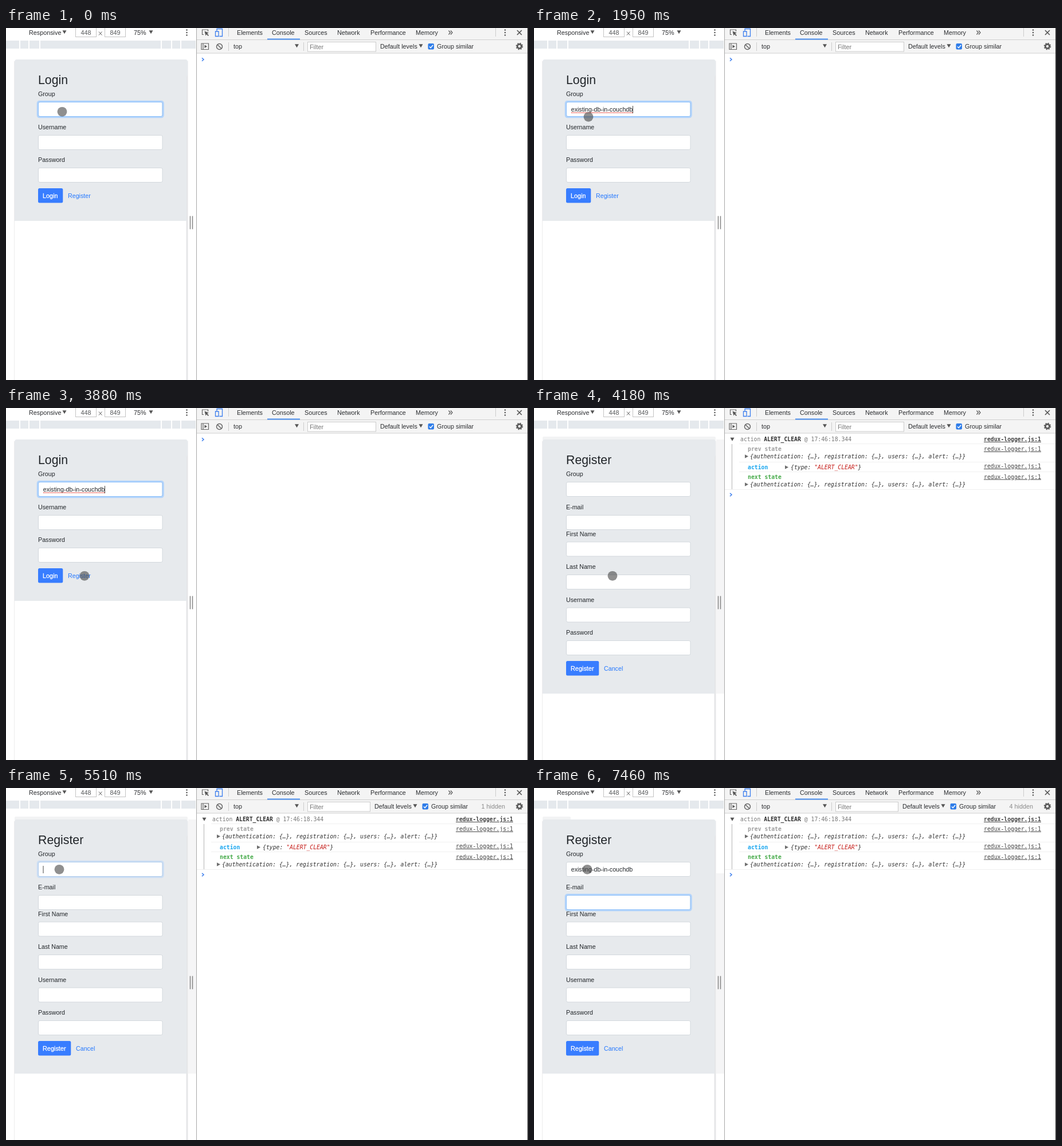
Write an HTML page that moves like this. It is 911 by 615 pixels and loops after 8000 ms.

```html
<!DOCTYPE html>
<html lang="en">
<head>
<meta charset="utf-8">
<title>Login and register</title>
<style>
  html, body { margin: 0; width: 100%; height: 100%; overflow: hidden; background: #fff; }
  svg { display: block; width: 911px; height: 615px; }
  text { font: 10.8px "Liberation Sans", Arial, sans-serif; fill: #2b2d30; white-space: pre; }
  .form { font-size: 10.7px; fill: #212529; }
  .title { font-size: 21.3px; fill: #212529; }
  .link { font-size: 10.7px; fill: #2478ff; }
  .btn { font-size: 10.9px; fill: #fff; stroke: #fff; stroke-width: .3px; }
  .mono { font: 9.78px "DejaVu Sans Mono", monospace; fill: #303030; }
  .b { font-weight: bold; }
  .i { font-style: italic; }
  .src { text-decoration: underline; text-anchor: end; fill: #444; }
  .mid { text-anchor: middle; }
</style>
</head>
<body>
<svg id="stage" viewBox="0 0 911 615"></svg>
<script>
const LOOP = 8000;
const rect = (x, y, w, h, fill, more = '') =>
  `<rect x="${x}" y="${y}" width="${w}" height="${h}" fill="${fill}" ${more}/>`;
const text = (x, y, s, cls = '', more = '') => `<text x="${x}" y="${y}" class="${cls}" ${more}>${s}</text>`;
const line = (d, color, width = 1, more = '') =>
  `<path d="${d}" fill="none" stroke="${color}" stroke-width="${width}" ${more}/>`;
const shape = (d, fill) => `<path d="${d}" fill="${fill}"/>`;
const down = (x, y, s = 3.5) => shape(`M${x - s} ${y - s * .8}h${2 * s}l${-s} ${s * 1.7}z`, '#555');
const right = (x, y) => shape(`M${x} ${y - 3.3}v6.6l6-3.3z`, '#6e6e6e');
const dots = (x, y) => [-4.5, 0, 4.5].map(d => `<circle cx="${x}" cy="${y + d}" r="1.3" fill="#5a5a5a"/>`).join('');
const group = (id, body) => `<g id="${id}">${body}</g>`;
const input = y => rect(56.5, y + .5, 216.5, 25, '#fff', 'rx="2.5" stroke="#d3d8dd"');
const field = (label, y) => text(56, y - 10, label, 'form') + input(y);
const ring = (id, y) => group(id,
  rect(55, y - 1, 219.5, 28, 'none', 'rx="3.5" stroke="#b3d4fb" stroke-width="2.6"') +
  rect(56.5, y + .5, 216.5, 25, 'none', 'rx="2.5" stroke="#8cc0fb"'));
const button = (y, w, label, link) => rect(56, y, w, 25.5, '#387dff', 'rx="2.5"') +
  text(64, y + 16.5, label, 'btn') + text(56 + w + 8.7, y + 16.5, link, 'link');

function deviceBar() {
  const ruler = [[0, 23], [25, 39], [41, 58], [60, 270], [272, 288], [290, 304], [306, 331]];
  const size = (x, n) => rect(x + .5, -2.5, 36, 18, '#fff', 'stroke="#c4c4c4"') + text(x + 18.5, 12, n, 'mid', 'fill-opacity=".8"');
  return text(40, 11.5, 'Responsive') + down(102, 7) + size(121, 448) +
    line('M162 6.5l5.5 6m0-6l-5.5 6', '#555') + size(172, 849) +
    text(223, 11.5, '75%') + down(253, 7) + dots(315.5, 8) +
    ruler.map(([a, b]) => rect(a, 22, b - a, 14, '#e5e9ed')).join('');
}

function devtools() {
  const tabs = { Elements: 403, Console: 464, Sources: 521, Network: 578, Performance: 636, Memory: 715 };
  return rect(333, 0, 578, 44, '#f4f4f4') + rect(333, 44, 578, 571, '#fff') +
    line('M333 20.5H911M333 44H911', '#cfcfcf') + rect(456, 18.5, 57, 2, '#4b8ff0') +
    Object.entries(tabs).map(([s, x]) => text(x, 12, s)).join('') +
    line('M388.5 0V15M854.5 0V15M388.5 25V40M519.5 25V40', '#cccccc') +
    // inspect and device icons
    line('M345 11.5h-2.5v-8.5h10v3', '#666', 1.2) + shape('M346.5 5.5l7.5 3-3 1.2 3 3-1.2 1.2-3-3-1.3 2.8z', '#555') +
    line('M368 5V1.5h9.5v13h-5M365.5 6h5.5v8.5h-5.5z', '#3b7ded', 1.3) +
    line('M772.5 4.5l3 3.5-3 3.5m3.5-7l3 3.5-3 3.5', '#555', 1.2) + dots(871, 8) +
    line('M892 4l8 8m0-8l-8 8', '#555', 1.7) +
    // sidebar, clear and settings icons
    line('M341 27h12.500v10.500H341zM344 27v10.500', '#666', 1.2) + shape('M346.500 29.500v5.500l4.500-2.750z', '#555') +
    '<circle cx="372.5" cy="32.500" r="5" fill="none" stroke="#666" stroke-width="1.5"/>' + line('M369 29l7 7', '#666', 1.5) +
    text(397, 35.5, 'top') + down(507.5, 31) +
    '<rect id="filter" x="526.5" y="24.5" width="119" height="16.5" fill="#fff" stroke="#cbcbcb"/>' +
    text(530, 36.5, 'Filter', '', 'style="fill:#777"') +
    group('levels', text(653, 35.5, 'Default levels') + down(724, 31) +
      rect(736.5, 27, 10.500, 10.500, '#2f7de9', 'rx="2"') + line('M739 32.500l2.200 2.200 4-5', '#fff', 1.5) +
      text(752, 35.5, 'Group similar')) +
    text(871, 35.5, '', '', 'id="hidden" style="fill:#8a8a8a;text-anchor:end"') +
    '<circle cx="896" cy="32" r="3.600" fill="none" stroke="#5a5a5a" stroke-width="2.800"/>' +
    '<circle cx="896" cy="32" r="5.500" fill="none" stroke="#5a5a5a" stroke-width="1.600" stroke-dasharray="2.160"/>' +
    group('prompt', line('M342 -2.7l3 2.700-3 2.700', '#3b7ded', 1.5)) +
    rect(332, 0, 1, 615, '#a8a8a8') + rect(910, 0, 1, 615, '#3a3a3a');
}

function logRows() {
  const state = '{authentication: {…}, registration: {…}, users: {…}, alert: {…}}';
  const tag = (y, s, color) => text(373, y, s, 'mono b', `style="fill:${color}"`);
  return line('M358 62.500H910M358 94.500H910M358 111.500H910M333 142.500H910', '#f0f0f0') +
    line('M345.500 63V142', '#b5b5b5') + down(346, 54.5) +
    text(360, 58, '<tspan fill="#777">action</tspan> <tspan class="b">ALERT_CLEAR</tspan> <tspan fill="#777">@ 17:46:18.344</tspan>', 'mono') +
    tag(75, 'prev state', '#9e9e9e') + tag(107, 'action', '#16a5ef') + tag(124, 'next state', '#45aa49') +
    [88, 137].map(y => right(368, y - 3.5) + text(377, y, state, 'mono i')).join('') +
    right(438, 103.5) + text(448, 107, '{type: <tspan fill="#c41a16">"ALERT_CLEAR"</tspan>}', 'mono i') +
    [58, 75, 105, 123.5].map((y, i) => text(885, y, 'redux-logger.js:1', 'mono src' + (i ? '' : ' b'))).join('');
}

const $ = id => document.getElementById(id);
$('stage').innerHTML = rect(0, 0, 911, 615, '#fff') + deviceBar() +
  rect(14, 58, 1, 557, '#ececec') + rect(314.5, 58, 3, 557, '#e5e6e8') +
  group('ghost', rect(15, 50, 302, 8, '#f2f3f4', 'id="band" rx="2"') + rect(318, 55, 14, 444, '#f5f5f6', 'id="side"')) +
  rect(15, 55, 302, 30, '#e7eaed', 'rx="4"') +
  '<rect id="panel" x="15" y="60" width="300" fill="#e7eaed"/>' +
  text(56, 98, '', 'title', 'id="title"') + field('Group', 129) +
  group('login', field('Username', 187) + field('Password', 244) + button(280, 43.3, 'Login', 'Register')) +
  group('register', field('E-mail', 187) + field('First Name', 233.5) + field('Last Name', 291) +
    field('Username', 348.5) + field('Password', 406) + button(442, 57.3, 'Register', 'Cancel')) +
  ring('ringGroup', 129) + ring('ringMail', 187) +
  group('typed', text(64.7, 146, 'existing-db-in-couchdb', 'form')) +
  group('spell', line('M65 148H172', '#e5433c', 1.3, 'stroke-dasharray="1.4 1"')) +
  rect(0, 0, 1, 13, '#444', 'id="caret"') +
  line('M321.500 328.500V351.500M325.500 328.500V351.500', '#858585', 1.5) + devtools() + group('log', logRows()) +
  '<circle id="mouse" r="8.4" fill="#444" fill-opacity=".6"/>';

// pointer stops: time, x, y
const path = [
  [0, 98, 146], [1950, 95, 155], [2090, 94, 178], [2240, 95, 196], [2390, 96, 204],
  [3280, 98, 208], [3430, 108, 232], [3580, 122, 262], [3730, 133, 285], [3880, 137, 293],
  [4770, 132, 272], [4920, 115, 210], [5060, 100, 150], [5210, 94, 126], [5360, 93, 142]
];
// the caret flips at each of these times
const blinks = [300, 750, 900, 1350, 1950, 2390, 2830, 3280, 3730, 4180, 5510, 5960, 6410, 7460];
const show = (id, on) => $(id).style.display = on ? '' : 'none';

function draw(t) {
  const within = (a, b) => t >= a && t < b;
  const registering = t >= 4180, pasted = within(900, 4180) || t >= 6410;
  const onMail = t >= 7010;

  $('title').textContent = registering ? 'Register' : 'Login';
  $('panel').setAttribute('height', registering ? 439 : 277);
  show('login', !registering);
  show('register', registering);
  show('log', registering);
  $('prompt').setAttribute('transform', `translate(0 ${registering ? 151.5 : 55})`);

  show('ghost', registering);
  $('band').setAttribute('width', t < 6410 ? 302 : 49);
  $('side').setAttribute('y', t < 6410 ? 55 : 149);
  $('side').setAttribute('height', t < 6410 ? 444 : 350);

  const narrow = t >= 4480;
  $('filter').setAttribute('width', narrow ? 109 : 119);
  $('levels').setAttribute('transform', `translate(${narrow ? -10 : 0} 0)`);
  $('hidden').textContent = narrow ? (t < 6410 ? 1 : 4) + ' hidden' : '';

  $('ringGroup').style.opacity = !registering || within(5660, 7010) ? 1 :
    within(5510, 5660) || within(7010, 7160) ? .5 : 0;
  $('ringMail').style.opacity = t >= 7160 ? 1 : onMail ? .5 : 0;

  show('typed', pasted);
  show('spell', pasted && !onMail);
  show('caret', blinks.filter(b => b <= t).length % 2);
  $('caret').setAttribute('x', pasted && !onMail ? 172 : 64.5);
  $('caret').setAttribute('y', onMail ? 193 : 136);

  const [, x, y] = path.filter(p => p[0] <= t).pop();
  $('mouse').setAttribute('cx', x);
  $('mouse').setAttribute('cy', y + .3);
}

const start = performance.now();
function tick() {
  draw((performance.now() - start) % LOOP);
  requestAnimationFrame(tick);
}
tick();
</script>
</body>
</html>
```
